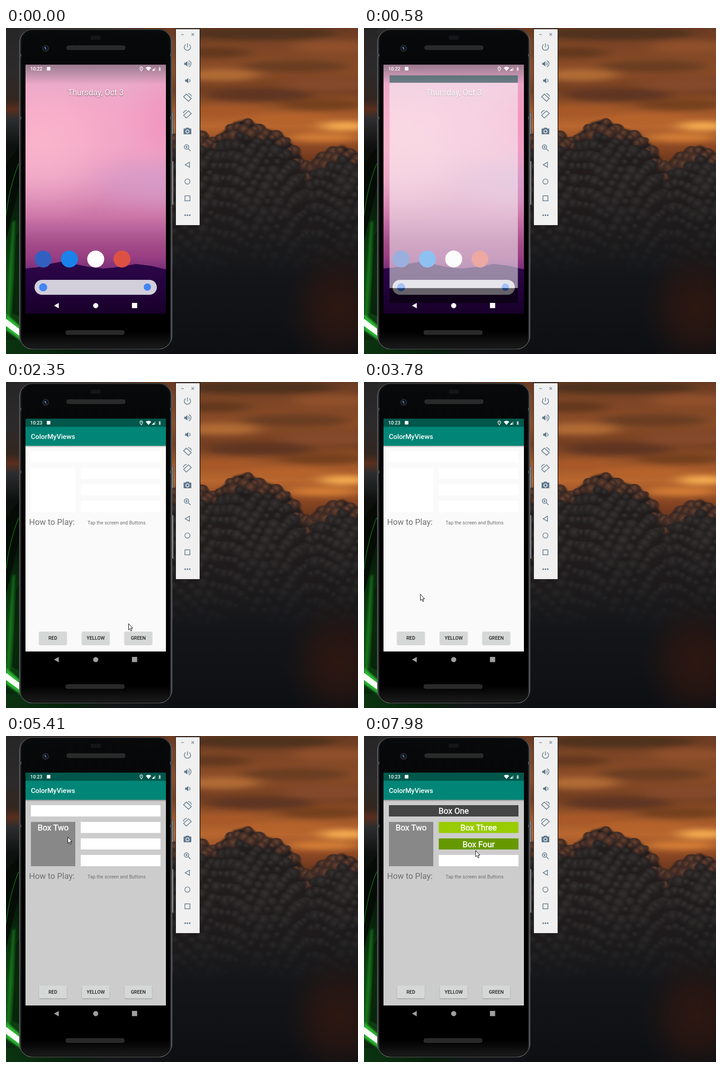
Recreate the animation shown at these times as an HTML page. Size 777 px wide and 721 px high, loop 8000 ms.

```html
<!DOCTYPE html>
<html lang="en">
<head>
<meta charset="utf-8">
<title>Phone demo</title>
<style>
html, body { margin: 0; width: 100%; height: 100%; overflow: hidden; background: #111; }
svg { display: block; width: 777px; height: 721px; }
text { font-family: Roboto, "Noto Sans", sans-serif; }
.medium { font-weight: 500; }
.box { font-size: 18.1px; fill: #fff; stroke: #fff; stroke-width: .45px; text-anchor: middle; }
</style>
</head>
<body>
<svg id="stage" viewBox="0 0 777 721" xmlns="http://www.w3.org/2000/svg"></svg>
<script>
const LOOP = 8000;
const stage = document.getElementById('stage');

const rect = (x, y, w, h, fill, extra = '') =>
  `<rect x="${x}" y="${y}" width="${w}" height="${h}" fill="${fill}" ${extra}/>`;
const circle = (x, y, r, fill, extra = '') =>
  `<circle cx="${x}" cy="${y}" r="${r}" fill="${fill}" ${extra}/>`;
const oval = (x, y, rx, ry, fill, extra = '') =>
  `<ellipse cx="${x}" cy="${y}" rx="${rx}" ry="${ry}" fill="${fill}" ${extra}/>`;
const path = (d, fill, extra = '') => `<path d="${d}" fill="${fill}" ${extra}/>`;
const label = (x, y, size, fill, text, extra = '') =>
  `<text x="${x}" y="${y}" font-size="${size}" fill="${fill}" ${extra}>${text}</text>`;
const group = (content, extra = '') => `<g ${extra}>${content}</g>`;
const stops = list => list.map(([o, c, a = 1]) =>
  `<stop offset="${o}" stop-color="${c}" stop-opacity="${a}"/>`).join('');
const vertical = (id, ...list) =>
  `<linearGradient id="${id}" x2="0" y2="1">${stops(list)}</linearGradient>`;
const horizontal = (id, ...list) => `<linearGradient id="${id}">${stops(list)}</linearGradient>`;
const puff = (id, ...list) =>
  `<radialGradient id="${id}" cx=".5" cy=".3" r=".6">${stops(list)}</radialGradient>`;
const glow = (id, color) => `<radialGradient id="${id}">${
  stops([[0, color], [.4, color, .7], [.75, color, .2], [1, color, 0]])}</radialGradient>`;
const blur = (id, x, y) =>
  `<filter id="${id}" x="-50%" y="-50%" width="200%" height="200%"><feGaussianBlur stdDeviation="${x} ${y}"/></filter>`;

function seeded(seed) {
  return () => (seed = (seed * 16807) % 2147483647) / 2147483647;
}

const defs = `<defs>
  ${vertical('sky', [0, '#6a3b23'], [.12, '#7c4526'], [.27, '#8c4d28'], [.42, '#743f22'],
    [.55, '#a0572a'], [.66, '#b9672f'], [.8, '#8a4723'], [1, '#4a2618'])}
  ${vertical('ground', [0, '#17181a', 0], [.3, '#17181a', .45], [.55, '#131519'], [1, '#0d0f13'])}
  ${vertical('side', [0, '#272627'], [.14, '#2c2a2a'], [.22, '#33261f'], [.25, '#5a2e1e'],
    [.28, '#2c2d2f'], [.36, '#0e110f'], [.46, '#050f07'], [.6, '#08280c'], [.76, '#0e4a12'],
    [.9, '#0c3a0f'], [1, '#06190a'])}
  ${horizontal('above', [0, '#2c2a2a'], [.5, '#3a2c26'], [1, '#6a3c22'])}
  ${horizontal('under', [0, '#0b3410'], [.4, '#07200b'], [.65, '#14161a'], [1, '#101114'])}
  ${vertical('wall', [0, '#dcaecb'], [.07, '#eaa9ca'], [.2, '#f4a6c7'], [.33, '#f1a5c7'],
    [.45, '#e49ac2'], [.54, '#d888b4'], [.61, '#cb75a7'], [.67, '#b45f98'],
    [.72, '#a34c88'], [.77, '#9a3f83'], [.83, '#752d78'], [1, '#4a1860'])}
  ${vertical('hills', [0, '#2d0749'], [.5, '#24033d'], [1, '#180029'])}
  ${vertical('scrim', [0, '#000', .3], [1, '#000', 0])}
  ${vertical('fall', [0, '#000', .3], [1, '#000', 0])}
  ${puff('warm', [0, '#66422f'], [.45, '#422c25'], [1, '#272020', 0])}
  ${puff('cool', [0, '#383231'], [.5, '#272424'], [1, '#1c1b1c', 0])}
  ${glow('blush', '#fcb9cc')} ${glow('rose', '#ee8cb9')} ${glow('lilac', '#cf9ccb')}
  ${glow('ember', '#2d1711')}
  ${horizontal('rim', [0, '#55575a'], [.007, '#303133'], [.016, '#121213'], [.984, '#121213'],
    [.993, '#38393b'], [1, '#66686b'])}
  ${vertical('shell', [0, '#08090a'], [.5, '#000'], [.95, '#000'], [1, '#1a1a1b'])}
  ${blur('streak', 18, 6)} ${blur('edge', 2, 2)} ${blur('lift', 1, 1)}
  <pattern id="mesh" width="3" height="3" patternUnits="userSpaceOnUse">
    ${rect(0, 0, 3, 3, '#303031')}${circle(1.5, 1.5, .9, '#19191a')}
  </pattern>
  <clipPath id="screen"><rect x="43" y="81" width="310" height="551"/></clipPath>
  <clipPath id="scene"><rect x="360" width="417" height="721"/></clipPath>
</defs>`;

function smoke() {
  const ridge = [[350, 235], [430, 225], [455, 243], [480, 226], [503, 206], [535, 198],
    [562, 217], [605, 228], [640, 262], [665, 303], [690, 276], [742, 257], [800, 285]];
  const top = x => {
    const i = ridge.findIndex(p => p[0] > x);
    const [x0, y0] = ridge[i - 1], [x1, y1] = ridge[i];
    return y0 + (y1 - y0) * (x - x0) / (x1 - x0);
  };
  const random = seeded(90210);
  const count = 320;
  const puffs = Array.from({ length: count }, (_, i) => {
    const x = 355 + (i * .618034 % 1) * 430, depth = (i / count) ** 1.3 * 300;
    const r = 9 + random() * 11;
    return oval(x.toFixed(1), (top(x) + depth + r * .7).toFixed(1), r.toFixed(1), (r * .9).toFixed(1),
      `url(#${depth < 26 ? 'warm' : 'cool'})`);
  });
  const mass = 'M350 721 ' + ridge.map(([x, y]) => `L${x} ${y + 3}`).join(' ') + ' V721Z';
  return path(mass, '#231e1d', 'filter="url(#edge)"') + puffs.join('');
}

function scenery() {
  const streaks = [
    [560, 12, 170, 14, '#50301f'], [720, 42, 90, 14, '#8f5029'], [460, 55, 80, 12, '#63371f'],
    [475, 104, 85, 13, '#b06a34'], [640, 85, 120, 14, '#6b3c20'], [710, 125, 100, 15, '#84482a'],
    [560, 148, 120, 14, '#5e3420'], [470, 183, 90, 10, '#a95928'], [700, 170, 100, 12, '#75401f'],
    [620, 200, 100, 9, '#b8632b'], [748, 217, 55, 10, '#f3aa50'], [700, 242, 80, 10, '#d27b34']
  ];
  const right = rect(360, 0, 417, 330, 'url(#sky)') +
    group(streaks.map(s => oval(...s)).join(''), 'filter="url(#streak)"') + smoke() +
    rect(360, 340, 417, 381, 'url(#ground)') + oval(735, 620, 130, 150, 'url(#ember)');
  const left = rect(0, 0, 45, 721, 'url(#side)') + rect(30, 0, 330, 30, 'url(#above)') +
    path('M0 300 L29 262 V350 L0 470Z', '#050a06', 'opacity=".8"') +
    path('M28 300 Q8 350 0 415', 'none', 'stroke="#176a1b" stroke-width="1.5"') +
    path('M14 430 L20 425 L9 640 L0 635Z', '#1f8a22', 'filter="url(#edge)" opacity=".65"') +
    path('M22 460 L33 440 V640 L14 630Z', '#061d09', 'opacity=".75"') +
    rect(0, 690, 360, 31, 'url(#under)') +
    path('M0 632 L34 662 V692 L0 668Z', '#35d83c', 'filter="url(#edge)" opacity=".8"') +
    path('M0 643 L34 669 V684 L0 659Z', '#f7fff5');
  return rect(0, 0, 777, 721, '#111214') + left + group(right, 'clip-path="url(#scene)"');
}

function phone() {
  const keys = [[187, 48], [294, 97]].map(([y, h]) =>
    rect(365, y, 5, h, '#55575a', 'rx="1.5"') + rect(367, y + 1, 1.2, h - 2, '#a3a5a7')).join('') +
    rect(365, 488, 3, 36, '#2c2d2f');
  const bands = [57, 196].map(y => rect(29, y, 5, 6, '#4a4c4e') + rect(362, y, 5, 6, '#4a4c4e')).join('');
  const speaker = (x, y) => rect(x, y, 129, 9, 'url(#mesh)', 'rx="4" stroke="#3c3c3d" stroke-width=".8"');
  return keys + rect(29, 2, 338, 709, 'url(#rim)', 'rx="30"') +
    rect(30, 3, 336, 707, 'none', 'rx="29" stroke="#646669" stroke-width="1.2"') + bands +
    rect(34, 6, 328, 701, 'url(#shell)', 'rx="25"') +
    speaker(134, 39) + speaker(132, 669) + rect(187, 17, 22, 9, '#151519', 'rx="2"') +
    circle(87.5, 45, 7.5, '#25282c') + circle(87.5, 45, 5, '#0b1020') +
    circle(86.5, 43.8, 1.8, '#5880ac') + circle(88, 46.5, 1, '#a3bdd5');
}

function home() {
  const icons = ['#335fc0', '#1a82ea', '#fff', '#dd5144'];
  return rect(43, 81, 310, 551, 'url(#wall)') +
    oval(80, 260, 190, 170, 'url(#blush)', 'opacity=".75"') +
    oval(355, 205, 110, 130, 'url(#rose)', 'opacity=".55"') +
    oval(330, 345, 170, 75, 'url(#lilac)', 'opacity=".6"') +
    path('M43 532 L70 529 L95 522 L122 517 L148 521 L180 528 L215 532 L245 529 L287 522 L320 526 L353 534 V632 H43Z', 'url(#hills)') +
    rect(43, 81, 310, 44, 'url(#scrim)') +
    label(198, 149, 18, '#fff', 'Thursday, Oct 3',
      'text-anchor="middle" style="text-shadow:0 1px 2px rgba(0,0,0,.6)"') +
    icons.map((c, i) => circle(82 + 58 * i, 511, 18.7, c)).join('') +
    rect(63, 557, 270, 33, '#d2cfdb', 'rx="16.5"') +
    circle(82, 573.5, 9, '#4285f4') + circle(312, 573, 8, '#4285f4');
}

const boxes = [
  { name: 'One', x: 55, y: 153, w: 286, h: 25, fill: '#444', at: 6190 },
  { name: 'Two', x: 55, y: 190, w: 98, h: 98, fill: '#888', at: 5330 },
  { name: 'Three', x: 165, y: 190, w: 176, h: 24.5, fill: '#9c0', at: 7200 },
  { name: 'Four', x: 165, y: 226.5, w: 176, h: 24.5, fill: '#690', at: 7890 },
  { x: 165, y: 263, w: 176, h: 25, at: Infinity }
];

function app() {
  const button = (x, name) =>
    rect(x, 553.5, 61, 28, '#000', 'rx="2" opacity=".22" filter="url(#lift)"') +
    rect(x, 552, 61, 28, '#d6d7d7', 'rx="1.5"') +
    label(x + 30.5, 569.8, 10.56, '#222', name, 'class="medium" text-anchor="middle"');
  const cells = boxes.map((b, i) => rect(b.x, b.y, b.w, b.h, '#fff', `id="box${i}"`) +
    (b.name ? `<text id="name${i}" class="box" x="${b.x + b.w / 2}" y="${b.y + 19.3}">Box ${b.name}</text>` : '')).join('');
  return rect(43, 141, 310, 455, '#fafafa', 'id="layout"') + rect(43, 141, 310, 4, 'url(#fall)') +
    rect(43, 99, 310, 42, '#008577') +
    label(55, 126, 15.08, '#fff', 'ColorMyViews', 'class="medium"') + cells +
    label(51, 315.5, 18.1, '#6f6f6f', 'How to Play:') +
    label(180, 315.2, 10.56, '#6f6f6f', 'Tap the screen and Buttons') +
    button(73, 'RED') + button(167.5, 'YELLOW') + button(261.5, 'GREEN');
}

function statusBar() {
  return label(53.5, 94, 10.56, '#fff', '10:22', 'class="medium" id="clock"') +
    rect(90, 86, 8, 8, '#fff', 'rx="1"') +
    group(path('M298.7 95 C296 91.5 295.6 90.5 295.6 89 A3.1 3.1 0 0 1 301.8 89 C301.8 90.5 301.4 91.5 298.7 95Z',
      'none', 'stroke="#fff" stroke-width="1.1"') + circle(298.7, 89, 1, '#fff'), 'id="pin"') +
    path('M308.5 88 Q314.5 83.5 320.5 88 L314.5 95Z', '#fff') +
    path('M322 94.5 L330 86.5 V94.5Z', '#fff', 'opacity=".45"') +
    path('M322 94.5 L327 89.5 V94.5Z', '#fff') +
    path('M337 87 H338.2 V86 H340.2 V87 H341.5 V95 H337Z', '#fff', 'opacity=".5"') +
    path('M340 87.5 L338 91.3 H339.2 L338.6 94.5 L340.8 90.5 H339.6Z', '#fff');
}

function navBar() {
  const fill = 'currentColor';
  return path('M116.5 608 V620 L106 614Z', fill) + circle(198, 614, 5.7, fill) +
    rect(278, 608, 11.5, 11.5, fill);
}

function panel() {
  const line = (d, extra = '') => path(d, 'none', `stroke="#5f788c" style="stroke-width:1.5" ${extra}`);
  const solid = (d, extra = '') => path(d, '#5f788c', extra);
  const cone = 'M-7 -2.5 H-4 L0 -6 V6 L-4 2.5 H-7Z';
  const turn = line('M-8.5 -1.5 L-2.5 -7.5 L8.5 2.5 L2.5 8.5Z') + line('M1.5 -8.5 Q7.5 -8 9 -2');
  const icons = [
    line('M0 -8 V1 M-4.2 -5.3 A7 7 0 1 0 4.2 -5.3'),
    solid(cone) + line('M2.5 -3.5 Q5 0 2.5 3.5 M3 -7 Q10 -4 7 3 Q6 6 3 7'),
    solid(cone, 'transform="translate(2)"') + line('M4.5 -3.5 Q7 0 4.5 3.5'),
    turn,
    group(turn, 'transform="scale(-1 1)"'),
    solid('M-8.5 -5.5 H-4.5 L-3 -7.5 H3 L4.5 -5.5 H8.5 V7 H-8.5Z') + circle(0, .7, 4.3, '#f0f0f0') + circle(0, .7, 2.6, '#5f788c'),
    line('M2 2 L7 7 M-7 -2 A5 5 0 1 1 3 -2 A5 5 0 1 1 -7 -2 M-4.5 -2 H.5 M-2 -4.5 V.5'),
    line('M4.5 -5.5 V5.5 L-5 0Z'),
    circle(0, 0, 5.7, 'none', 'stroke="#5f788c" stroke-width="1.4"'),
    line('M-5.5 -5.5 H5.5 V5.5 H-5.5Z'),
    [-5, 0, 5].map(x => circle(x, 0, 1.8, '#5f788c')).join('')
  ];
  return rect(374, 1, 55, 436, '#17130f') + rect(375, 2.5, 52.5, 433.5, '#f0f0f0') +
    line('M386.5 14.5 H392.5 M409.5 11.5 l5.5 5.5 m0 -5.5 l-5.5 5.5', 'opacity=".8"') +
    icons.map((icon, i) => group(icon, `transform="translate(400.5 ${42 + 37.2 * i})"`)).join('');
}

stage.innerHTML = defs + scenery() + phone() + panel() +
  group(
    rect(43, 81, 310, 551, '#000') + group(home(), 'id="home"') +
    group(rect(43, 81, 310, 18, '#00574b') + rect(43, 99, 310, 497, '#fafafa') +
      rect(43, 596, 310, 36, '#000'), 'id="window"') +
    group(app(), 'id="app"') + statusBar() + group(navBar(), 'id="nav"'),
    'clip-path="url(#screen)"') +
  group(circle(0, 0, 10, '#ff0', 'id="tap"') +
    path('M.5 .5 V14.2 L3.6 11.4 L5.8 16.5 L8 15.5 L5.8 10.6 H9.8Z', '#fff', 'stroke="#000" stroke-width="1"'), 'id="cursor"');

const el = Object.fromEntries([...stage.querySelectorAll('[id]')].map(n => [n.id, n]));
const set = (id, name, value) => el[id].setAttribute(name, value);
const show = (id, on) => set(id, 'visibility', on ? 'visible' : 'hidden');

// Number of discrete updates done: 0 before start, count from end on.
function updates(t, start, end, count) {
  if (t < start) return 0;
  if (t >= end) return count;
  return Math.floor((t - start) / (end - start) * (count - 1)) + 1;
}

// start, end, updates, x, y
const moves = [
  [1430, 1810, 6, 428, 472], [1890, 2120, 4, 300, 520], [2350, 2700, 5, 150, 589],
  [2770, 2990, 4, 102, 571], [3140, 3230, 2, 101, 570], [3370, 3540, 3, 124, 469],
  [4010, 4090, 2, 147, 458], [4390, 4790, 6, 136, 247], [5410, 5410, 1, 136, 223],
  [5490, 5810, 5, 190, 164], [6270, 6880, 9, 235, 198], [7200, 7430, 4, 241, 234],
  [7890, 7980, 2, 246, 253]
];
const taps = [[3610, 3780], [4860, 5260], [5960, 6110], [7050, 7130], [7670, 7810]];

function cursorAt(t) {
  let x = 832, y = 385;
  for (const [start, end, count, toX, toY] of moves) {
    const p = updates(t, start, end, count) / count;
    x += (toX - x) * p;
    y += (toY - y) * p;
    if (p < 1) break;
  }
  return [x, y];
}

function draw(t) {
  const opened = t >= 730;
  const grow = Math.max(0, updates(t, 500, 730, 4) - 1) / 3;
  const scale = 1 - .194 * (1 - grow) ** 2;
  show('home', !opened);
  show('window', t >= 500);
  set('window', 'opacity', .28 + .72 * grow);
  set('window', 'transform', `translate(198 356.5) scale(${scale}) translate(-198 -356.5)`);
  el.clock.textContent = opened ? '10:23' : '10:22';
  show('pin', t < 6500);

  const fade = updates(t, 1050, 1360, 5);
  set('app', 'opacity', fade && .12 + .22 * (fade - 1));
  const grey = 255 - 24 * Math.max(0, fade - 1);
  set('nav', 'color', `rgb(${grey},${grey},${grey})`);

  set('layout', 'fill', t < 3840 ? '#fafafa' : '#ccc');
  boxes.forEach((b, i) => {
    set('box' + i, 'fill', t >= b.at ? b.fill : '#fff');
    if (b.name) set('name' + i, 'opacity', t >= b.at ? 1 : 0);
  });

  const [x, y] = cursorAt(t);
  set('cursor', 'transform', `translate(${Math.round(x)} ${Math.round(y)})`);
  set('cursor', 'opacity', t >= 1430 ? 1 : 0);
  set('tap', 'opacity', taps.some(([on, off]) => t >= on && t < off) ? .47 : 0);
}

const began = performance.now();
function tick() {
  draw((performance.now() - began) % LOOP);
  requestAnimationFrame(tick);
}
draw(0);
requestAnimationFrame(tick);
</script>
</body>
</html>
```
